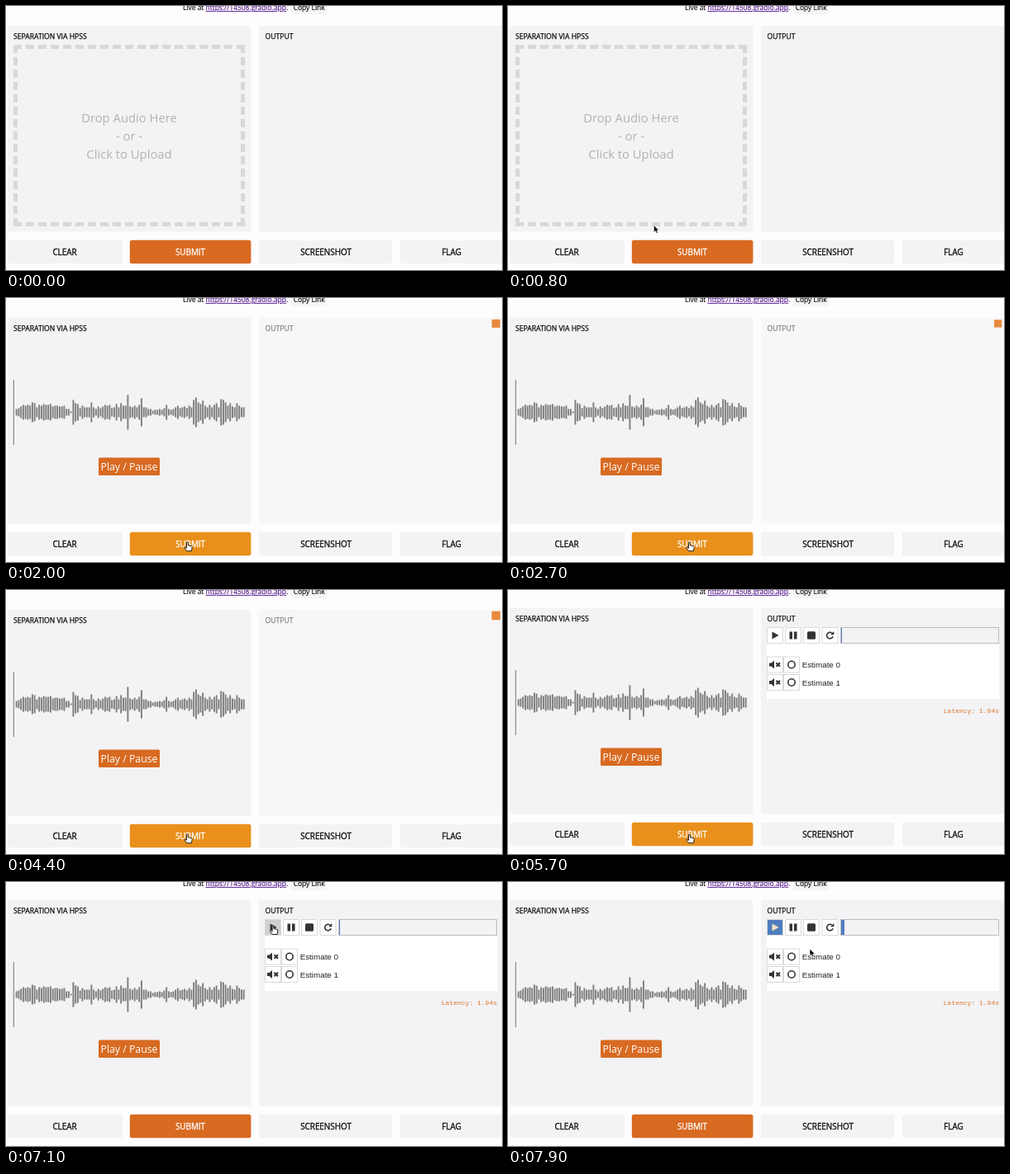
Recreate the animation shown at these times as an HTML page. Size 600 by 320 pixels, loop 8 s.

```html
<!DOCTYPE html>
<html lang="en">
<head>
<meta charset="utf-8">
<style>
  html, body { margin: 0; width: 100%; height: 100%; overflow: hidden; background: #fdfcfe; }
  svg { display: block; width: 100vw; height: 100vh; }
  text { font-family: "Open Sans", sans-serif; fill: #0c0c0c; white-space: pre; }
  .mid { text-anchor: middle; }
  .title { font-size: 8.62px; stroke: #0c0c0c; stroke-width: .25px; }
  .btn { font-size: 9.9px; font-weight: 500; stroke-width: .3px; }
  .head { font-size: 8.45px; stroke: #0c0c0c; stroke-width: .15px; }
  .link { fill: #551a8b; stroke: #551a8b; text-decoration: underline; }
  .drop { font-size: 14.8px; fill: #b3b2b4; }
  .play { font-size: 12.3px; fill: #fff; }
  .track { font-family: "Liberation Sans", Arial, sans-serif; font-size: 9.8px; fill: #222; }
  .latency { font-family: "Liberation Mono", monospace; font-size: 8px; fill: #d8742a; }
</style>
</head>
<body>
<svg id="stage" viewBox="0 0 600 320" preserveAspectRatio="none"></svg>
<script>
const LOOP = 8000;
const DROP = 900, LOAD = 2000, DONE = 5600, PLAY = 7300;
const PANEL = '#f3f2f4', ORANGE = '#d86a21', HOVER = '#e8901b', BLUE = '#4f7dbe';

const rect = (x, y, w, h, fill, more = '') =>
  `<rect x="${x}" y="${y}" width="${w}" height="${h}" fill="${fill}" ${more}/>`;
const text = (x, y, str, cls, more = '') =>
  `<text x="${x}" y="${y}" class="${cls}" ${more}>${str}</text>`;
const path = (d, more = 'fill="#333"') => `<path d="${d}" ${more}/>`;
const button = (x, w, label, mid, fill = PANEL, ink = '#0c0c0c', id = '') =>
  rect(x, 283.7, w, 28.6, fill, `rx="2.5" ${id}`) +
  text(mid, 301.7, label, 'btn mid', `style="fill:${ink};stroke:${ink}"`);
const tool = (x, y, icon, id = '') =>
  rect(x + .5, y + .5, 19, 19, '#fff', `stroke="#d9d9db" ${id}`) +
  `<g transform="translate(${x + 10} ${y + 10})">${icon}</g>`;

const levels = [
  4, 5, 7, 9, 8, 9, 8, 12, 11, 6, 9, 8, 10, 9, 9, 10, 7, 8, 8, 7,
  7, 8, 4, 4, 1, 15, 11, 10, 5, 8, 6, 6, 6, 12, 6, 4, 7, 5, 7, 9,
  8, 9, 5, 6, 10, 6, 11, 8, 8, 21, 7, 6, 8, 6, 9, 17, 6, 6, 4, 4,
  2, 3, 3, 4, 3, 5, 9, 4, 3, 4, 6, 8, 5, 6, 7, 5, 8, 6, 15, 18, 12,
  10, 14, 8, 6, 9, 6, 9, 11, 6, 16, 15, 12, 8, 11, 7, 6, 11, 8, 6, 6
];
const bars = levels.map((h, i) =>
  rect((11.7 + i * 2.75).toFixed(2), 138.5 - h, 1.9, h * 2, '#7d7c7e')).join('');

const dropZone =
  path('M9 49.5H289M9 264.5H289M11.5 47V267M286.5 47V267',
    'stroke="#d8d7d9" stroke-width="5" stroke-dasharray="10 5" fill="none"') +
  ['Drop Audio Here', '- or -', 'Click to Upload']
    .map((s, i) => text(149, 140.5 + i * 22, s, 'drop mid')).join('');

const wave =
  rect(8.8, 99, 1, 79, '#777') + bars +
  rect(112, 193.6, 74, 21.4, ORANGE, 'rx="1.5"') +
  text(149, 208.8, 'Play / Pause', 'play mid');

const icons = {
  play: path('M-3.5 -4.5L4.5 0L-3.5 4.5Z', 'id="playIcon" fill="#333"'),
  pause: path('M-4.5 -4.5H-1V4.5H-4.5ZM1 -4.5H4.5V4.5H1Z'),
  stop: rect(-5, -4.7, 10, 9.4, '#333', 'rx="1.5"'),
  loop: path('M3.6 1.2A3.8 3.8 0 1 1 2.4 -2.8', 'fill="none" stroke="#333" stroke-width="1.6"') +
    path('M4.8 -5V-.7H.5Z'),
  mute: path('M-7 -2H-4.5L-1 -5V5L-4.5 2H-7Z') +
    path('M1.5 -2.2L6 2.2M6 -2.2L1.5 2.2', 'stroke="#333" stroke-width="2"'),
  solo: '<circle r="4.2" fill="none" stroke="#333" stroke-width="1.6"/>'
};
const track = (y, label) =>
  tool(313, y, icons.mute) + tool(333, y, icons.solo) + text(355.7, y + 13.7, label, 'track');

const result =
  rect(313, 47, 281, 87, '#fff') +
  tool(313, 47, icons.play, 'id="play"') + tool(335, 47, icons.pause, 'id="pause"') +
  tool(357, 47, icons.stop, 'id="stop"') + tool(379.5, 47, icons.loop) +
  rect(402.5, 47.5, 191, 19, PANEL, 'stroke="#bdbdc0"') +
  rect(403, 48, 1, 18, BLUE, 'id="bar"') +
  track(82.5, 'Estimate 0') + track(104, 'Estimate 1') +
  text(594, 151, 'Latency: 1.94s', 'latency', 'text-anchor="end"');

const stage = document.getElementById('stage');
stage.innerHTML =
  rect(0, 0, 600, 320, '#fdfcfe') +
  rect(345, -6, 43, 16, '#f5f4f6') +
  text(214, 5, 'Live at <tspan class="link">https://14508.gradio.app</tspan>.', 'head') +
  text(347.7, 5, 'Copy Link', 'head') +
  `<g id="page">` +
  rect(2, 23.7, 294.3, 249.8, PANEL, 'rx="2.5"') +
  text(9, 39.6, 'SEPARATION VIA HPSS', 'title') +
  `<g id="drop">${dropZone}</g><g id="wave">${wave}</g>` +
  `<g id="output">` + rect(306, 23.7, 300, 249.8, PANEL, 'rx="2.5"') +
  text(313.5, 39.6, 'OUTPUT', 'title') + `</g>` +
  `<g id="result">${result}</g>` +
  button(2, 139, 'CLEAR', 71) +
  button(149.8, 146.6, 'SUBMIT', 223, ORANGE, '#fff', 'id="submit"') +
  button(306, 161, 'SCREENSHOT', 387) + button(477, 130, 'FLAG', 539) +
  `</g>` +
  rect(-5, -5, 10, 10, '#e88a3c', 'id="loader"') +
  `<g id="cursor">` +
  path('M0 0V8.6L2 6.8L3.4 9.8L5 9L3.7 6.2H6.3Z', 'id="arrow" fill="#000" stroke="#fff" stroke-width=".7"') +
  path('M-.9 .6C-.9 -.6 .9 -.6 .9 .6V3.6L5 4.5Q6 4.8 5.8 6L5 10.5H-.8L-3.4 6.8C-3.8 5.8 -2.6 5.4 -1.9 6.2L-.9 7.2Z',
    'id="hand" fill="#fff" stroke="#111" stroke-width=".9"') +
  `</g>`;

const el = id => document.getElementById(id);
const show = (id, on) => el(id).setAttribute('visibility', on ? 'visible' : 'hidden');
const set = (id, name, value) => el(id).setAttribute(name, value);

// time, x, y of the pointer tip
const route = [
  [450, 215, 322], [1150, 138, 210], [1500, 138, 210], [1800, 219.4, 296.2],
  [5800, 219.4, 296.2], [6400, 359, 51], [6750, 323, 53], [7300, 323, 53], [7800, 365, 81]
];
function pointer(t) {
  const i = route.findIndex(p => p[0] > t);
  if (i < 0) return route[route.length - 1].slice(1);
  if (i === 0) return route[0].slice(1);
  const [a, b] = [route[i - 1], route[i]];
  const u = (t - a[0]) / (b[0] - a[0]);
  const e = u * u * (3 - 2 * u);
  return [a[1] + (b[1] - a[1]) * e, a[2] + (b[2] - a[2]) * e];
}

function draw(t) {
  const loading = t >= LOAD && t < DONE, done = t >= DONE, playing = t >= PLAY;
  const [x, y] = pointer(t);
  const over = (l, top, r, bottom) => x >= l && x <= r && y >= top && y <= bottom;
  const onSubmit = t > 1500 && over(150, 284, 296, 312);
  const onTool = left => done && over(left, 45, left + 20, 65);

  set('page', 'transform', `translate(0 ${done ? -2 : 0})`);
  show('drop', t < DROP);
  show('wave', t >= DROP);
  show('result', done);
  set('output', 'opacity', loading ? .5 : 1);
  set('submit', 'fill', onSubmit ? HOVER : ORANGE);

  show('loader', loading);
  const size = 1 + .08 * Math.sin((t - LOAD) / 1000 * Math.PI * 2);
  set('loader', 'transform', `translate(592.7 31) scale(${size})`);

  const tint = left => onTool(left) ? '#d0cfd1' : '#fff';
  set('play', 'fill', playing ? BLUE : tint(313));
  set('playIcon', 'fill', playing ? '#f3e3c4' : '#333');
  set('pause', 'fill', tint(335));
  set('stop', 'fill', tint(357));
  set('bar', 'width', playing ? 1 + (t - PLAY) / 200 : 1);

  const hand = onSubmit || onTool(313) || onTool(335) || onTool(357);
  show('cursor', t >= 500);
  set('cursor', 'transform', `translate(${x} ${y})`);
  set('hand', 'display', hand ? 'inline' : 'none');
  set('arrow', 'display', hand ? 'none' : 'inline');
}

const start = performance.now();
function tick() {
  draw((performance.now() - start) % LOOP);
  requestAnimationFrame(tick);
}
tick();
</script>
</body>
</html>
```
